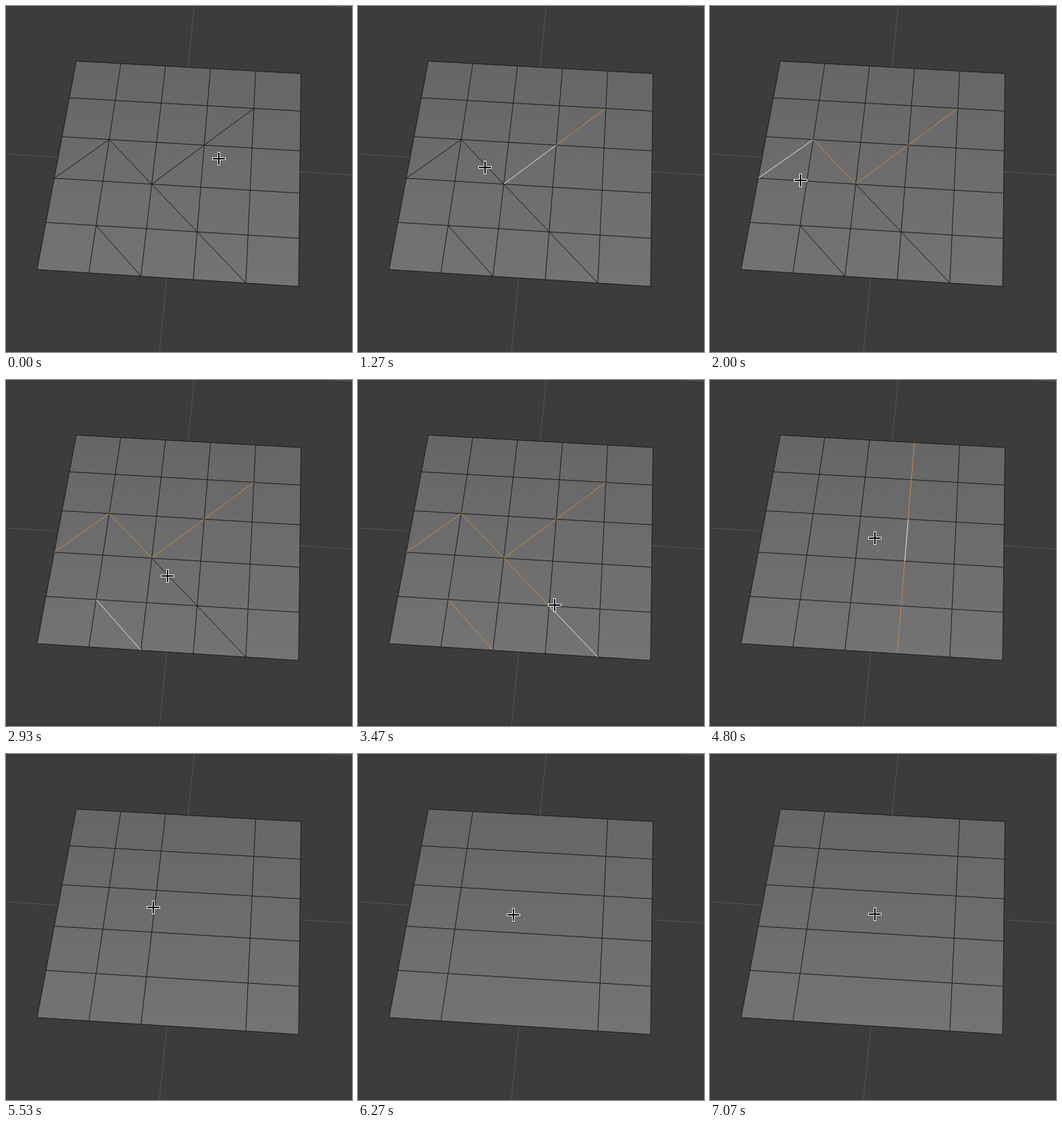
Recreate the animation shown at these times as an HTML page with a canvas. Size 512 px wide and 512 px high, loop 8.14 s.

```html
<!DOCTYPE html>
<html lang="en">
<head>
<meta charset="utf-8">
<title>Dissolving mesh edges</title>
<style>
html, body { margin: 0; width: 100%; height: 100%; overflow: hidden; background: #3c3c3c; }
canvas { display: block; }
</style>
</head>
<body>
<canvas id="stage" width="512" height="512"></canvas>
<script>
const ctx = document.getElementById('stage').getContext('2d');
const LOOP = 8140, TICKS_PER_MS = 15 / 1000, N = 5;
const BLACK = '#1a1a1a', ORANGE = '#d08838', WHITE = '#e8e8e8', AXIS = '#575757';

// Clicks: tick, x, y. The cursor leaves with the click and rests before the next one.
const clicks = [
  [4, 315, 226], [10, 331, 185], [17, 266, 228], [24, 188, 239], [30, 120, 222],
  [37, 174, 361], [45, 239, 290], [51, 309, 364], [60, 259, 277], [69, 290, 240],
  [77, 244, 234], [86, 218, 227], [93, 230, 238], [99, 230, 238], [111, 244, 237]
];
const REST = 5;

// Chains of diagonal edges in picking order, vertices written as column and row
const diagonals = ['41 32 23 12 03', '14 25', '23 34 45'].flatMap(chain => {
  const points = chain.split(' ').map(p => [...p].map(Number));
  return points.slice(1).map((p, i) => [points[i], p]);
});

// What the clicks do: one diagonal each, dissolve, then select and dissolve two columns
const FIRST_PICK = 2, DISSOLVE = FIRST_PICK + diagonals.length;
const columnPick = { 3: DISSOLVE + 1, 2: DISSOLVE + 3 };
const ACTIVE_ROW = 2;

const mix = (a, b, f) => a + (b - a) * f;
const foreshorten = (f, k) => f / (1 + k * (1 - f));

// Position of a grid vertex in perspective
function vertex([col, row]) {
  const u = foreshorten(col / N, 0.012), v = foreshorten(row / N, 0.17);
  return [
    mix(mix(104, 436.5, u), mix(46, 433, u), v),
    mix(mix(81.5, 100, u), mix(390, 415, u), v)
  ];
}

function line(a, b, color) {
  ctx.strokeStyle = color;
  ctx.beginPath();
  ctx.moveTo(...a);
  ctx.lineTo(...b);
  ctx.stroke();
}

const edge = (a, b, color = BLACK) => line(vertex(a), vertex(b), color);

function drawPlane() {
  ctx.fillStyle = '#3c3c3c';
  ctx.fillRect(0, 0, 512, 512);
  line([278.5, 0], [227, 512], AXIS);
  line([0, 219], [512, 250], AXIS);
  line([480, 0], [512, 1.5], AXIS);

  const shade = ctx.createLinearGradient(256, 82, 256, 415);
  shade.addColorStop(0, '#666666');
  shade.addColorStop(1, '#747474');
  ctx.fillStyle = shade;
  ctx.beginPath();
  for (const corner of [[0, 0], [N, 0], [N, N], [0, N]]) ctx.lineTo(...vertex(corner));
  ctx.fill();
}

function drawColumn(col, done) {
  const pick = columnPick[col] ?? Infinity;
  if (done > pick) return;
  if (done < pick) return edge([col, 0], [col, N]);
  for (let row = 0; row < N; row++) {
    edge([col, row], [col, row + 1], row === ACTIVE_ROW ? WHITE : ORANGE);
  }
}

function drawEdges(done) {
  for (let i = 0; i <= N; i++) {
    edge([0, i], [N, i]);
    drawColumn(i, done);
  }
  if (done >= DISSOLVE) return;
  const active = done - FIRST_PICK;
  diagonals.forEach(([a, b], i) =>
    edge(a, b, i > active ? BLACK : i === active ? WHITE : ORANGE));
}

function cursorAt(tick, done) {
  const [leave, x0, y0] = clicks.find(c => c[0] - 1 + REST > tick && c === clicks[0])
    ?? clicks[0];
  let from = [leave, x0, y0], to = from;
  for (let i = 1; i < clicks.length && tick >= clicks[i - 1][0]; i++) {
    from = clicks[i - 1];
    to = clicks[i];
  }
  const start = from[0] - 1, end = Math.max(start + 1, to[0] - REST);
  const f = Math.min(1, (tick - start) / (end - start));
  const eased = f * f * (3 - 2 * f);
  return [1, 2].map(k => Math.round(mix(from[k], to[k], eased)));
}

// Black cross with a white rim
function drawCursor([x, y]) {
  for (const [reach, half, color] of [[10, 2, '#f4f4f4'], [9, 1, '#000000']]) {
    ctx.fillStyle = color;
    ctx.fillRect(x - reach, y - half, 2 * reach, 2 * half);
    ctx.fillRect(x - half, y - reach, 2 * half, 2 * reach);
  }
}

function draw(now) {
  const tick = Math.floor((now % LOOP + 3.4) * TICKS_PER_MS);
  const done = clicks.filter(c => tick >= c[0]).length;
  drawPlane();
  drawEdges(done);
  drawCursor(cursorAt(tick, done));
}

let start;
function frame(now) {
  start ??= now;
  draw(now - start);
  requestAnimationFrame(frame);
}
draw(0);
requestAnimationFrame(frame);
</script>
</body>
</html>
```
